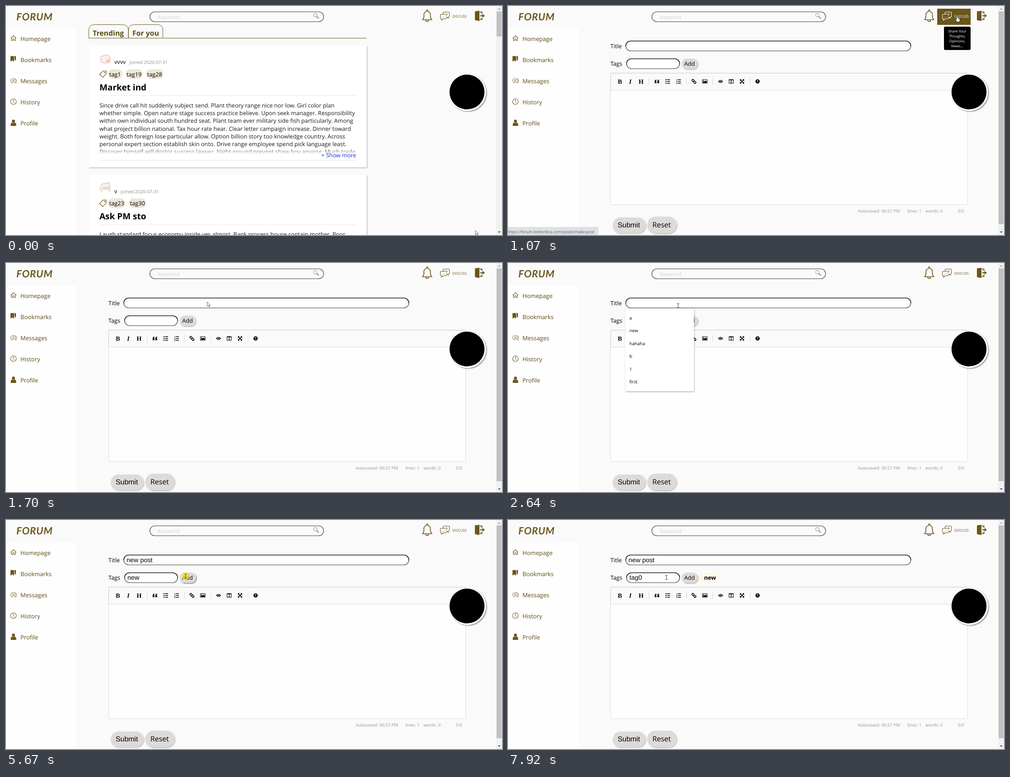
An HTML page for the animation above (8000 ms loop, 1099x510 px).

```html
<!DOCTYPE html>
<html lang="en">
<head>
<meta charset="utf-8">
<title>Forum</title>
<style>
  html, body { margin: 0; width: 100%; height: 100%; overflow: hidden; background: #fafafa; }
  svg { display: block; width: 1099px; height: 510px; }
  text { font-family: "Open Sans", "Noto Sans", sans-serif; white-space: pre; text-rendering: geometricPrecision; }
  .arial { font-family: "Liberation Sans", Arial, sans-serif; }
  .serif { font-family: "Liberation Serif", serif; font-weight: 700; }
  .bold { font-weight: 700; }
  .line { fill: none; stroke: currentColor; }
  .logo { font-family: Lato, sans-serif; font-style: italic; font-weight: 700; letter-spacing: .8px; }
</style>
</head>
<body>
<svg id="stage" viewBox="0 0 1099 510" xmlns="http://www.w3.org/2000/svg"></svg>
<script>
const LOOP = 8000, BROWN = '#6b561b', BASE = 12.69, ROW = 28.5;
const stage = document.getElementById('stage');

const text = (x, y, size, str, attrs = '') =>
  `<text x="${x}" y="${y}" font-size="${size}" ${attrs}>${str}</text>`;
const rect = (x, y, w, h, fill, attrs = '') =>
  `<rect x="${x}" y="${y}" width="${w}" height="${h}" fill="${fill}" ${attrs}/>`;
const path = (d, attrs = '') => `<path d="${d}" ${attrs}/>`;
const group = (id, body, attrs = '') => `<g id="${id}" ${attrs}>${body}</g>`;
const at = (x, y, body) => `<g transform="translate(${x} ${y})">${body}</g>`;

const defs = `<defs>
  <filter id="cardShadow" x="-5%" y="-5%" width="110%" height="115%">
    <feDropShadow dx="2" dy="2" stdDeviation="1.5" flood-opacity=".2"/></filter>
  <filter id="softShadow" x="-20%" y="-20%" width="140%" height="150%">
    <feDropShadow dx="1" dy="1.5" stdDeviation="1" flood-opacity=".3"/></filter>
  <filter id="discShadow" x="-20%" y="-20%" width="140%" height="140%">
    <feDropShadow dx="1.5" dy="1.5" stdDeviation="1" flood-opacity=".5"/></filter>
  <linearGradient id="inset" x2="0" y2="1">
    <stop offset=".4" stop-color="#1c1c1c"/><stop offset=".65" stop-color="#767676"/></linearGradient>
  <linearGradient id="fade" x2="0" y2="1">
    <stop offset="0" stop-color="#fff" stop-opacity="0"/><stop offset="1" stop-color="#fff"/></linearGradient>
</defs>`;

function sidebar() {
  const icons = [
    path('M10.5 72L16.5 66l6 6M12 71v6h3v-4h3v4h3v-6', 'class="line" stroke-width="1.1"'),
    path('M10 111.5h8v12.5l-4-3-4 3zM19 111.5h3v10l-3-2z', 'fill="currentColor"'),
    path('M13 170q-3-1-3-4 1-4.5 6-4.5t6 4q-.5 4-6 4l-4 2zM19 162q4.5 1 4.5 4.5-.5 2-1.5 3l1 2-4-1.5M13 165h6M13 167h5',
      'class="line" stroke-width=".8"'),
    '<circle cx="16.5" cy="213" r="6.3" class="line" stroke-width="1.1"/>' +
      path('M16.5 208.5v5l2.5 2.5', 'class="line"'),
    '<circle cx="16.5" cy="256.5" r="3.4" fill="currentColor"/>' +
      path('M10.5 267v-3q0-3.5 3-4.5 3 2 6 0 3 1 3 4.5v3z', 'fill="currentColor"')
  ];
  const names = ['Homepage', 'Bookmarks', 'Messages', 'History', 'Profile'];
  return rect(0, 50, 157, 460, '#fefefe') + icons.join('') +
    names.map((name, i) => text(32, 77.5 + 47.2 * i, 13.07, name, 'fill="#5f4a14"')).join('');
}

function header() {
  const bell = path('M923 30.5q3-3 3-8v-3q0-6 5.5-7v-2a1.7 1.7 0 0 1 3.4 0v2q5.5 1 5.5 7v3q0 5 3 8zM930 31.5q0 3 3.2 3t3.2-3',
    'class="line" stroke-width="1.7"');
  const discuss = path('M968.5 18v-3q0-1.5 1.5-1.5h11q1.5 0 1.5 1.5v8q0 1.5-1.5 1.5h-1v3l-3-3M974 18.5h-10q-1.5 0-1.5 1.5v7q0 1.5 1.5 1.5h1v3.5l3.5-3.5h6q1.5 0 1.5-1.5v-2M966 25h1M969 25h1M972 25h1',
    'class="line" stroke-width="1.1"') + text(974, 22.5, 8.5, '?', 'fill="currentColor" class="bold"') +
    text(989, 25.5, 7.97, 'DISCUSS', 'fill="currentColor"');
  const exit = path('M1039 12l10-1.5v23l-10-2zM1050 12.5h5.5v5h-2v-3H1050zM1050 31h5.5v-5h-2v3H1050zM1051 20.5h5v-3l5 4.3-5 4.3v-3h-5z',
    'fill="currentColor"');
  return text(23, 32, 22.3, 'FORUM', `fill="${BROWN}" class="logo"`) +
    rect(318.8, 13, 385, 22, '#fafafa', 'rx="11" stroke="#777" stroke-width="1.7"') +
    text(336, 28.5, 11.9, 'Keyword', 'fill="#d4d4d4"') +
    '<circle cx="685.5" cy="20.5" r="4" fill="none" stroke="#888"/>' +
    path('M688.5 23.5l4.5 4.5', 'stroke="#888" stroke-width="2"') +
    bell + exit + rect(951, 6, 74, 36, BROWN, 'id="hoverBox"') + group('discuss', discuss);
}

function tooltip() {
  const lines = ['Share Your', 'Thoughts,', 'Opinions,', 'News...'];
  return rect(966, 46, 59, 52, '#000', 'rx="3"') +
    lines.map((line, i) => text(995.5, 59 + 11 * i, 8, line, 'fill="#fff" text-anchor="middle"')).join('');
}

function card(y, { user, joinedX, tags, title, body, avatar }) {
  const tagIcon = path('M207.5 64.5l7.5-8h7v6.5l-7.5 8z', `fill="none" stroke="${BROWN}" stroke-width="1.2"`) +
    `<circle cx="219" cy="60" r="1.1" fill="none" stroke="${BROWN}"/>`;
  const pills = tags.map(([x, w, label]) =>
    rect(x, 53, w, 21, '#ece6d9', 'rx="10"') + text(x + 2.7, 68.5, BASE, label)).join('');
  return at(0, y,
    rect(183, 0, 616, 271, '#fff', 'filter="url(#cardShadow)"') + avatar +
    text(240, 41, BASE, user) + text(joinedX, 41, 10.1, 'joined 2020-07-31', 'fill="#8a8a8a"') +
    tagIcon + pills + text(207, 99.5, 19, title, 'class="bold"') +
    rect(207, 111, 569, 1, '#e6e6e6') +
    body.map((line, i) => text(207, 137.8 + 17.28 * i, BASE, line, 'fill="#1a1a1a"')).join('') +
    rect(200, 229, 590, 13, 'url(#fade)') + rect(200, 242, 590, 20, '#fff') +
    rect(207, 255, 569, 1, '#e6e6e6') +
    text(776, 249, BASE, '+ Show more', 'fill="#1433e0" text-anchor="end"'));
}

function feed() {
  const tabs = path('M183.5 71V54q0-12.5 13-12.5h61q13 0 13.5 12.5V71M271.5 71V54q0-12.5 12-12.5h52q12 0 12 12.5V71M183 71.5H799',
    `fill="none" stroke="${BROWN}"`) +
    ['Trending', 'For you'].map((name, i) =>
      text(192 + 88 * i, 66, 15.85, name, 'class="bold" fill="#5f4a14"')).join('');
  const sketch = 'fill="#fbefe9" stroke="#b9a9a2" stroke-width=".9"';
  return tabs + card(88, {
    user: 'vvvv', joinedX: 273.5, title: 'Market ind',
    tags: [[226, 32, 'tag1'], [264.5, 38.5, 'tag19'], [310, 39, 'tag28']],
    avatar: path('M210 31q-2-9 6-8 7-5 13 1 4 6 1 12-8 5-18 2z', sketch) +
      '<circle cx="226" cy="35" r="4.5" fill="#f5c9b5"/>',
    body: ['Since drive call hit suddenly subject send. Plant theory range nice nor low. Girl color plan',
      'whether simple. Open nature stage success practice believe. Upon seek manager. Responsibility',
      'within own individual south hundred seat. Plant team ever military side fish particularly. Among',
      'what project billion national. Tax hour rate hear. Clear letter campaign increase. Dinner toward',
      'weight. Both foreign lose particular allow. Option billion story too knowledge country. Across',
      'personal expert section establish skin onto. Drive range employee spend pick language least.',
      'Discover himself will doctor success lawyer. Night ground prevent show boy anyone. Much trade']
  }) + card(375.6, {
    user: 'v', joinedX: 254, title: 'Ask PM sto',
    tags: [[226, 38, 'tag23'], [272, 39, 'tag30']],
    avatar: path('M210 24l6-4 13-2 2 9-2 12M210 24l-2 8 5 7M213 29h6v4h-6zM221 28h6v4h-6z', sketch),
    body: ['Laugh standard focus economy inside yes almost. Bank process house contain mother. Poor']
  });
}

function toolbar() {
  const line = 'fill="none" stroke="#000" stroke-width="1.4"';
  const quote = path('M-5 4v-4q0-3.5 4-4v2q-1.5.3-1.5 2h1.5v4zM1 4v-4q0-3.5 4-4v2q-1.5.3-1.5 2H5v4z');
  const rows = path('M-1.5-4H5M-1.5 0H5M-1.5 4H5', line);
  const bullets = path('M-5-4h2.2M-5 0h2.2M-5 4h2.2', 'stroke="#000" stroke-width="2.2"');
  const digits = [1, 2, 3].map((n, i) => text(-5.3, -2.4 + 4 * i, 4.6, n, 'class="bold"')).join('');
  const link = '<g transform="rotate(45)">' +
    rect(-5.5, -2, 5.5, 4, 'none', 'rx="2" stroke="#000" stroke-width="1.5"') +
    rect(0, -2, 5.5, 4, 'none', 'rx="2" stroke="#000" stroke-width="1.5"') + '</g>';
  const picture = rect(-5.2, -4, 10.5, 8, 'none', 'stroke="#000" stroke-width="1.1" rx=".5"') +
    path('M-4 3V1l2-2 1.5 1.5L2-2l2.5 3v2z') + '<circle cx="-2.5" cy="-1.8" r="1"/>';
  const eye = path('M-5.5 0Q0-7 5.5 0 0 7-5.5 0z') +
    '<circle r="2.6" fill="#fff"/><circle r="1.7"/>';
  const columns = rect(-4.7, -4, 9.4, 8, 'none', 'stroke="#000" stroke-width="1.1"') +
    path('M-4.7-3.5h9.4M0-4v8', 'stroke="#000" stroke-width="1.5"');
  const arrows = path('M-3.5-3.5l7 7M3.5-3.5l-7 7', 'stroke="#000" stroke-width="1.7"') +
    path('M-4.7-4.7h4l-4 4zM4.7-4.7v4l-4-4zM-4.7 4.7v-4l4 4zM4.7 4.7h-4l4-4z');
  const help = '<circle r="4.7"/>' + text(0, 2.9, 8, '?', 'fill="#fff" class="bold" text-anchor="middle"');
  const letter = (s, style = '') => text(0, 4.7, 14, s, `class="serif" text-anchor="middle" ${style}`);
  const items = [[248, letter('B')], [271, letter('I', 'font-style="italic"')], [295, letter('H')],
    [330, quote], [354, bullets + rows], [378, digits + rows], [412, link], [436, picture],
    [471, eye], [494.5, columns], [518.5, arrows], [553, help]];
  return items.map(([x, body]) => at(x, 168, body)).join('') +
    [312, 395, 453, 536].map(x => rect(x, 159, 1, 17, '#d9d9d9')).join('');
}

function form() {
  const field = (x, y, w) => rect(x, y, w, 22, '#fff', 'rx="11" stroke="url(#inset)" stroke-width="1.7"');
  const button = (x, y, w, h) => rect(x, y, w, h, '#dfdada', `rx="${h / 2}" filter="url(#softShadow)"`);
  const note = (x, s) => text(x, 459.5, 9.6, s, 'fill="#959694"');
  return text(227, 93.5, BASE, 'Title') + field(261, 78, 631.5) +
    text(227, 133, BASE, 'Tags') + field(262.8, 117.5, 117.5) +
    rect(385, 117, 36, 23, '#dfdada', 'rx="11.5" id="addButton"') + text(390.5, 133, BASE, 'Add') +
    group('newTag', rect(423, 118, 48, 21, '#fdf8e9') + text(434.5, 133, BASE, 'new', 'class="bold"')) +
    rect(227.5, 149.5, 791, 293, '#fefefe', 'rx="3" stroke="#dcdcdc"') +
    path('M228 187V152q0-2 2-2h786q2 0 2 2v35z', 'fill="#fafafa"') +
    path('M227.5 187V152q0-2.5 2.5-2.5h786q2.5 0 2.5 2.5v35', 'fill="none" stroke="#c6c6c6"') +
    rect(228, 187, 790, 1, '#dcdcdc') + toolbar() +
    note(775, 'Autosaved: 06:57 PM') + note(885, 'lines: 1') + note(925, 'words: 0') + note(997, '0:0') +
    button(232, 471, 73, 34.5) + text(243, 493, 15.9, 'Submit', 'class="arial"') +
    button(308.5, 469, 65.5, 37) + text(320, 493, 15.9, 'Reset') +
    text(267, 93.5, 14.4, '', 'class="arial" id="titleText"') +
    text(269, 133.3, 14.4, '', 'class="arial" id="tagText"') +
    rect(0, 0, 1, 15, '#000', 'id="caret"');
}

const frame = rect(1086, 0, 13, 510, '#f1f1f1') + rect(1087, 12, 11.3, 56, '#c1c1c1', 'id="thumb"') +
  path('M1090 8l3-3.5 3 3.5z', 'fill="#a3a3a3"') + path('M1090 502l3 3.5 3-3.5z', 'fill="#505050"') +
  '<circle cx="1022.7" cy="192.5" r="41" fill="#fff" filter="url(#discShadow)"/>' +
  '<circle cx="1021.5" cy="191.5" r="38.8" fill="#000"/>';

const status = rect(0, 493, 199, 17, '#dee1e6', 'stroke="#c8cbd0" stroke-width=".8"') +
  text(-2, 505.5, 8.93, 'https://forum.brelontica.com/posts/make-post', 'fill="#555a60"');

const pointers = group('arrow', path('M0 0v9.5l2.3-2 1.7 3.5 1.5-.7-1.6-3.3h3z', 'fill="#fff" stroke="#345" stroke-width=".8"')) +
  group('hand', path('M-1.2 8V1q0-1.3 1.2-1.3T1.2 1v4q4 .2 5 1.5v4q0 2-1 4H-.5q-1-2.5-3.5-5 0-2 2.8.5z',
    'fill="#fff" stroke="#000" stroke-width=".8"') + path('M2.8 6v3M4.5 6.5v2.5', 'stroke="#000" stroke-width=".5"')) +
  group('beam', path('M-2.5-4.5H-.7L0-4l.7-.5h1.8M0-4V4M-2.5 4.5H-.7L0 4l.7.5h1.8', 'fill="none" stroke="#222" stroke-width=".9"'));

stage.innerHTML = defs + rect(0, 0, 1099, 510, '#fafafa') + group('feed', feed()) + group('form', form()) +
  group('bar', rect(0, 0, 1086, 40, '#fafafa') + header()) +
  `<g color="${BROWN}">${sidebar()}</g>` + frame + group('tooltip', tooltip()) +
  group('suggest', '') + group('status', status) +
  '<circle id="click" r="8.5" fill="#f3e41f" opacity=".7"/>' + group('pointer', pointers);

const el = Object.fromEntries([...stage.querySelectorAll('[id]')].map(node => [node.id, node]));
el.bar.setAttribute('color', BROWN);
const show = (node, on) => node.setAttribute('display', on ? 'inline' : 'none');
const within = (t, from, to) => t >= from && t < to;

// [from, to, steps, x, y, easing power]
const MOVES = [[70, 690, 9, 995, 21, 3.7], [1250, 1860, 9, 377, 95, 2], [5350, 5530, 3, 398, 125, 1],
  [5980, 6130, 3, 343, 129, 1], [7920, 7921, 1, 351, 128, 1]];
const CLICKS = [[1950, 2110], [5670, 5820], [6130, 6210]];
const TITLE = [[0, ''], [2110, ''], [2810, 'n'], [2880, 'ne'], [3040, 'new'], [3270, 'new '],
  [3500, 'new p'], [3710, 'new pos'], [3940, 'new post']];
const TAG = [[0, ''], [4190, ''], [4740, 'n'], [4820, 'ne'], [4890, 'new'], [5750, ''], [6130, ''],
  [6280, 't'], [6440, 'ta'], [6590, 'tag'], [7220, 'tag0']];
const SUGGEST = [[0, []], [2030, ['a', 'new', 'hahaha', 'b', '1', 'first']], [2810, ['new', 'new post']],
  [3270, ['new post']], [3940, []], [6210, ['new', 'a', 'b', 'first']], [6280, []]];

const latest = (track, t) => track.findLast(([start]) => start <= t);

function pointerAt(t) {
  let x = 1040, y = 500;
  for (const [from, to, steps, toX, toY, power] of MOVES) {
    if (t < from) break;
    const stepTime = (to - from) / Math.max(1, steps - 1);
    const k = Math.min(steps, Math.floor((t - from) / stepTime + 1e-6) + 1) / steps;
    const e = 1 - (1 - k) ** power;
    x += (toX - x) * e;
    y += (toY - y) * e;
  }
  return [x, y];
}

function drawSuggestions(t) {
  const items = latest(SUGGEST, t)[1];
  const [x, y] = t < 5000 ? [259.5, 101.5] : [262, 141.5];
  el.suggest.innerHTML = items.length ? rect(x, y, 152.5, items.length * ROW + 13, '#fff',
    'rx="2" filter="url(#softShadow)" stroke="#ddd" stroke-width=".5"') +
    items.map((s, i) => text(x + 9.5, y + 24 + ROW * i, 9.9, s)).join('') : '';
}

function drawTyping(t) {
  const [titleTime, title] = latest(TITLE, t), [tagTime, tag] = latest(TAG, t);
  el.titleText.textContent = title;
  el.tagText.textContent = tag;
  const inTitle = t < 4190;
  const focused = within(t, 2110, 5670) || t >= 6130;
  show(el.caret, focused && (t - (inTitle ? titleTime : tagTime)) % 1060 < 530);
  const width = (inTitle ? el.titleText : el.tagText).getComputedTextLength();
  el.caret.setAttribute('x', Math.floor((inTitle ? 267 : 269) + width));
  el.caret.setAttribute('y', inTitle ? 81 : 121);
}

function render(t) {
  const [x, y] = pointerAt(t);
  const hover = within(x, 951, 1025) && within(y, 6, 42);
  const editing = t >= 1070;
  show(el.feed, !editing);
  show(el.form, editing);
  el.thumb.setAttribute('height', editing ? 474 : 56);

  show(el.hoverBox, hover);
  show(el.tooltip, hover);
  el.discuss.setAttribute('color', hover ? '#fff' : BROWN);
  show(el.status, within(t, 840, 1410));
  el.status.setAttribute('opacity', t < 920 ? 0.5 : 1);

  drawSuggestions(t);
  if (editing) drawTyping(t);
  show(el.newTag, t >= 5750);
  el.addButton.setAttribute('filter', within(t, 5530, 5980) ? 'url(#discShadow)' : 'url(#softShadow)');

  const clicking = CLICKS.some(([from, to]) => within(t, from, to));
  show(el.click, clicking);
  el.click.setAttribute('cx', x);
  el.click.setAttribute('cy', y);
  el.pointer.setAttribute('transform', `translate(${x} ${y})`);
  show(el.hand, hover);
  show(el.beam, t >= 1780);
  show(el.arrow, !hover && t < 1780);
}

function tick(now) {
  render(now % LOOP);
  requestAnimationFrame(tick);
}
render(0);
requestAnimationFrame(tick);
</script>
</body>
</html>
```
